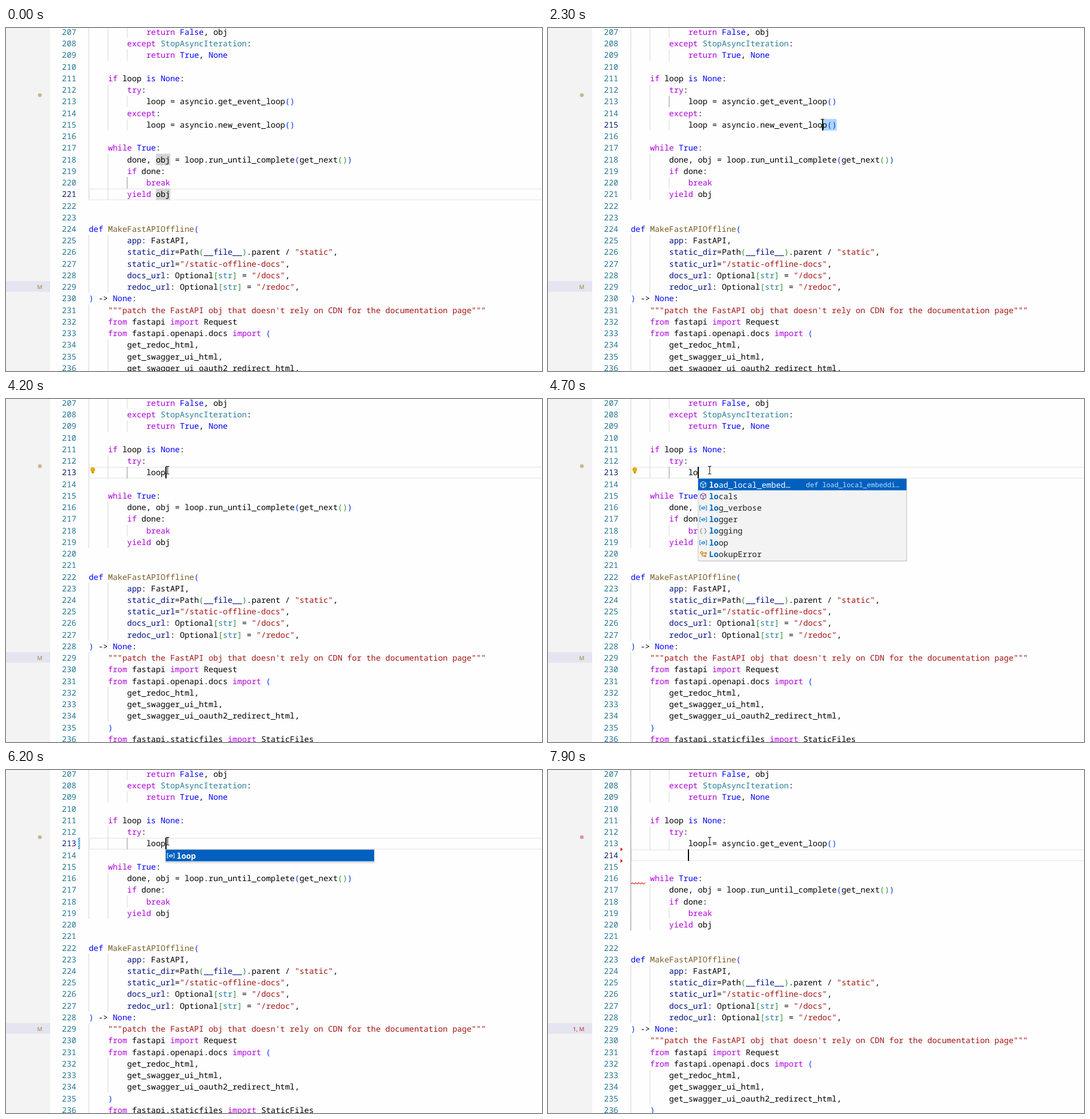
These frames come from a looping animation (935 by 599 pixels, 8 s). An HTML page:

```html
<!DOCTYPE html>
<html lang="en">
<head>
<meta charset="utf-8">
<title>Editor session</title>
<style>
html, body { margin: 0; width: 100%; height: 100%; overflow: hidden; background: #fefefe; }
svg { display: block; width: 935px; height: 599px; }
text { white-space: pre; text-rendering: geometricPrecision; }
.code { font: 13.92px "Noto Sans Mono", "DejaVu Sans Mono", monospace; }
.detail { font: 500 11.8px "Noto Sans Mono", "DejaVu Sans Mono", monospace; }
.ui { font: 600 10px "Open Sans", "Noto Sans", sans-serif; }
.doc { font: 13px "Open Sans", "Noto Sans", sans-serif; }
</style>
</head>
<body>
<svg id="stage" viewBox="0 0 935 599"></svg>
<script>
const LOOP = 8000, STEP = 100;
const X0 = 144.5, CW = 8.352, LH = 20.24, TOP = -3.1, FIRST = 207;
const BLUE = '#0000ff', PURPLE = '#af00db', TEAL = '#267f99', NAVY = '#001080';
const BRACKETS = ['#0431fa', '#319331', '#7b3814'];
const stage = document.getElementById('stage');

const HEAD = `            return False, obj
        except StopAsyncIteration:
            return True, None

    if loop is None:
        try:`.split('\n');
const ASSIGN = '            loop = asyncio.get_event_loop()';
const FALLBACK = ['        except:', '            loop = asyncio.new_event_loop()'];
const TAIL = `
    while True:
        done, obj = loop.run_until_complete(get_next())
        if done:
            break
        yield obj


def MakeFastAPIOffline(
        app: FastAPI,
        static_dir=Path(__file__).parent / "static",
        static_url="/static-offline-docs",
        docs_url: Optional[str] = "/docs",
        redoc_url: Optional[str] = "/redoc",
) -> None:
    """patch the FastAPI obj that doesn't rely on CDN for the documentation page"""
    from fastapi import Request
    from fastapi.openapi.docs import (
        get_redoc_html,
        get_swagger_ui_html,
        get_swagger_ui_oauth2_redirect_html,
    )
    from fastapi.staticfiles import StaticFiles`.split('\n');

const COLORS = {};
const paint = (words, color) => words.split(' ').forEach(w => COLORS[w] = color);
paint('return except if try while break yield from import', PURPLE);
paint('False True None def is', BLUE);
paint('StopAsyncIteration str', TEAL);
paint('MakeFastAPIOffline', '#795e26');
paint('app static_dir static_url docs_url redoc_url __file__', NAVY);

const esc = s => s.replace(/&/g, '&amp;').replace(/</g, '&lt;').replace(/>/g, '&gt;');
const colX = col => X0 + col * CW;
const rowY = row => TOP + (row - FIRST) * LH;
const rect = (x, y, w, h, fill, more = '') =>
  `<rect x="${x}" y="${y}" width="${w}" height="${h}" fill="${fill}" ${more}/>`;
const path = (d, stroke, width = 1, more = '') =>
  `<path d="${d}" fill="none" stroke="${stroke}" stroke-width="${width}" ${more}/>`;
const label = (x, y, s, fill, cls = 'code', more = '') =>
  `<text x="${x}" y="${y}" fill="${fill}" class="${cls}" ${more}>${esc(s)}</text>`;

// Mouse keyframes: time, x, y
const MOUSE = [[100, 900, 8], [600, 420, 134], [1200, 420, 134], [1400, 395, 174],
  [2000, 507, 172], [2100, 507, 172], [3000, 282, 124]];

function mouseAt(t) {
  if (t < 100) return null;
  const i = MOUSE.findIndex(k => k[0] > t);
  if (i < 0) return [282, 124];
  const [a, b] = [MOUSE[i - 1], MOUSE[i]];
  let p = (t - a[0]) / (b[0] - a[0]);
  p = p * p * (3 - 2 * p);
  return [a[1] + (b[1] - a[1]) * p, a[2] + (b[2] - a[2]) * p];
}

// What has been typed after the indent on line 213, by time
const TYPED = [[4200, 'loop'], [4600, 'loo'], [4700, 'lo'], [4800, 'l'], [5000, ''],
  [5700, 'l'], [5800, 'lo'], [6000, 'loo'], [6200, 'loop'], [6400, 'loop ']];

const LISTS = {
  l: ['k lambda', 'f len', 'f license', 'c list', 'f list_config_llm_models',
    'f list_embed_models', 'f list_online_embed_models', 'f llm_device',
    'f load_local_embeddings', 'f locals', 'v log_verbose', 'v logger'],
  lo: ['f load_local_embed…', 'f locals', 'v log_verbose', 'v logger', 'm logging',
    'v loop', 'c LookupError'],
  loo: ['v loop', 'c LookupError'],
  loop: ['v loop']
};
const DETAILS = { l: 'keyword lambda', lo: 'def load_local_embeddi…' };

function stateAt(t) {
  const mouse = mouseAt(t);
  const s = { mouse, row: 213, col: 16, caret: true, line: ASSIGN, extra: FALLBACK };
  if (t < 900) Object.assign(s, { row: 221, caret: false });
  else if (t < 2000) Object.assign(s, { col: 33, caret: t < 1300 });
  else if (t < 4200) {
    s.row = Math.floor((mouse[1] - TOP) / LH) + FIRST;
    const text = s.row === 213 ? ASSIGN : FALLBACK[s.row - 214];
    s.col = Math.min(text.length, Math.round((mouse[0] - 4 - X0) / CW));
    s.select = t >= 2200;
    s.caret = t < 3300 || t >= 3800;
  } else if (t < 7400) {
    const typed = TYPED.filter(k => k[0] <= t).pop()[1];
    s.line = ' '.repeat(12) + typed;
    s.col = s.line.length;
    s.extra = [];
    if (t >= 4500 && LISTS[typed]) s.list = typed;
    s.ghost = t >= 6500;
    s.caret = !(t >= 5200 && t < 5700) && !(t >= 6500 && t < 7000);
  } else if (t < 7600) Object.assign(s, { col: 43, extra: [] });
  else Object.assign(s, { row: 214, col: 12, extra: [''] });

  s.lines = [...HEAD, s.line, ...s.extra, ...TAIL];
  s.bulb = s.row === 213 && t >= 1100 && t < 5100;
  s.changed = t >= 5200 && t < 7400;
  s.error = t >= 7000;
  s.entered = t >= 7600;
  s.failed = t >= 7700;
  s.active = t < 900 ? [8, 220, 220]
    : s.entered ? [0, 207, 220]
    : s.line.trim() ? [8, 213, 213] : [4, 212, 212];
  return s;
}

function codeLine(text, y, depth) {
  let out = '';
  for (const m of text.matchAll(/"""[^]*?"""|"[^"]*"|\w+|[()[\]]|[^\s\w()[\]"]+/g)) {
    const w = m[0];
    let color = '#000';
    if (w[0] === '"') color = '#a31515';
    else if (/[([]/.test(w)) color = BRACKETS[depth.n++ % 3];
    else if (/[)\]]/.test(w)) color = BRACKETS[--depth.n % 3];
    else if (Object.hasOwn(COLORS, w)) color = COLORS[w];
    out += `<tspan x="${colX(m.index).toFixed(2)}" fill="${color}">${esc(w)}</tspan>`;
  }
  return `<text y="${y}" class="code">${out}</text>`;
}

const indent = text => text.search(/\S/);

function guides(s) {
  let out = '';
  s.lines.forEach((text, i) => {
    const solid = s.lines.slice(i).find(l => l.trim()) || '';
    const row = FIRST + i;
    for (let col = 0; col < indent(solid); col += 4) {
      const [c, from, to] = s.active;
      const on = col === c && row >= from && row <= to;
      out += rect(colX(col) - .5, rowY(row), 1, LH, on ? '#8f8f8f' : '#d6d6d6');
    }
  });
  return out;
}

function selection(s) {
  let out = '', dots = '';
  for (let row = s.row; row <= 215; row++) {
    const text = s.lines[row - FIRST];
    const from = row === s.row ? s.col : 0;
    const to = row === 215 ? 43 : text.length + 1;
    out += rect(colX(from), rowY(row), Math.max(0, to - from) * CW, LH + .1, '#add6ff', 'rx="2"');
    for (let c = from; c < text.length; c++)
      if (text[c] === ' ')
        dots += `<circle cx="${colX(c + .5)}" cy="${rowY(row) + 10.6}" r=".9" fill="#7f9fbd"/>`;
  }
  return out + dots;
}

function icon(kind, x, y, on) {
  const tint = c => on ? '#fff' : c;
  const at = `transform="translate(${x} ${y})"`;
  if (kind === 'f') return path('M0-5.5 4.7-3V2.8L0 5.5-4.7 2.8V-3ZM-4.7-3 0-.4 4.7-3M0-.4V5.5', tint('#652d90'), 1, at);
  if (kind === 'v') return path('M-4-4H-6V4H-4M4-4H6V4H4M-3 0 0-2.2 3-1V1.2L0 2.6-3 1ZM-3 0 0 .5 3-1', tint('#007acc'), 1, at);
  if (kind === 'c') return path('M-5-2.5-2.5-5 0-2.5-2.5 0ZM0-2H3.5M-1.5 0V3H2M3-2 4.5-3.5 6-2 4.5-.5ZM2 3 3.5 1.5 5 3 3.5 4.5Z', tint('#d67e00'), 1.3, at);
  if (kind === 'm') return path('M-2-4.5Q-4-4.5-4-2.5T-5.5 0Q-4 .5-4 2.5T-2 4.5M2-4.5Q4-4.5 4-2.5T5.5 0Q4 .5 4 2.5T2 4.5', tint('#616161'), 1, at);
  return path('M-6-4H0M2-4H6M-6-1.3H-3M-1-1.3H5M-6 1.4H2M4 1.4H6M-6 4H-2M0 4H5', tint('#616161'), 1.1, at);
}

function popup(s) {
  const items = LISTS[s.list], x = colX(s.col) + .5, y = 138.9, w = 363.5;
  const h = items.length * LH + 2;
  let out = rect(x + 1, y + 2, w, h, '#000', 'opacity=".08" rx="2"') +
    rect(x, y, w, h, '#f3f3f3', 'stroke="#c8c8c8"') +
    rect(x, y + .3, w, LH, '#0060c0');
  items.forEach((item, i) => {
    const name = item.slice(2), n = s.list.length, by = y + 15.6 + i * LH, on = !i;
    out += icon(item[0], x + 8.8, y + 10.8 + i * LH, on) +
      `<text x="${x + 19}" y="${by}" class="code" fill="${on ? '#fff' : '#1e1e1e'}">` +
      `<tspan font-weight="700" fill="${on ? '#fff' : '#0066bf'}">${name.slice(0, n)}</tspan>` +
      `<tspan x="${x + 19 + n * CW}">${name.slice(n)}</tspan></text>`;
  });
  const long = items.length === 12;
  if (DETAILS[s.list])
    out += label(x + w - (long ? 9 : 12.5), y + 14.8, DETAILS[s.list], '#c4dcf3', 'detail', 'text-anchor="end"');
  if (long) out += rect(x + w - 8.7, y, 8.7, 148, '#bababa');
  return out;
}

const hoverBox = (x, y, w, h) => rect(x, y, w, h, '#f8f8f8', 'stroke="#c8c8c8" rx="2"');

function hover(t) {
  if (t >= 500 && t < 900) {
    return hoverBox(370, .5, 564, 117.5) +
      label(379, 20, '(function) def get_event_loop() -> AbstractEventLoop', '#1e1e1e') +
      rect(370, 31, 564, 1, '#dcdcdc') +
      ['Return an asyncio event loop.',
        'When called from a coroutine or a callback, this function will always return',
        'the running event loop.'].map((l, i) => label(379, 51 + i * 24, l, '#333', 'doc')).join('');
  }
  if (t >= 3200 && t < 4200) {
    const fade = t < 3300 ? .4 : 1;
    return `<g opacity="${fade}">` + hoverBox(245.5, 61.5, 379, 56.5) +
      label(254, 83, '(parameter) loop: AbstractEventLoop | None', '#1e1e1e') +
      label(254, 104, '(variable) loop: AbstractEventLoop', '#1e1e1e') + '</g>';
  }
  return '';
}

function sidebar(s) {
  return rect(0, 0, 77, 599, '#f3f3f3') + rect(0, 442, 77, 18.5, '#e4e5f0') +
    `<circle cx="59" cy="117.3" r="3.3" fill="${s.failed ? '#d99a98' : '#c8b68a'}"/>` +
    label(63.5, 455.7, s.failed ? '1, M' : 'M', s.failed ? '#c4504e' : '#b09655', 'ui', 'text-anchor="end"');
}

function gutter(s) {
  let out = '';
  s.lines.forEach((_, i) => {
    const row = FIRST + i;
    out += label(122.6, rowY(row) + 15, String(row), row === s.row ? '#0b216f' : '#237893', 'code', 'text-anchor="end"');
  });
  if (s.changed) out += rect(126, rowY(213), 3.2, LH, 'url(#hatch)');
  if (s.entered)
    for (const row of [214, 215])
      out += `<path d="M126.5 ${rowY(row) - 3.3}l4 3.3-4 3.3z" fill="#d8100c"/>`;
  if (s.bulb)
    out += '<circle cx="151.3" cy="123.2" r="4" fill="#e8ab00"/>' + rect(149.6, 126.5, 3.5, 3.6, '#c48f00', 'rx="1"');
  return out;
}

function squiggle(row) {
  let d = `M144.5 ${rowY(row) + 20}`;
  for (let i = 0; i < 9; i++) d += `l2.8 ${i % 2 ? 2.2 : -2.2}`;
  return path(d, '#e51400', 1.1);
}

function render(t) {
  const s = stateAt(t), depth = { n: 0 };
  const mark = (row, col, n) => rect(colX(col), rowY(row), n * CW, LH, '#d4d4d4');
  let out = `<defs><pattern id="hatch" width="3" height="3" patternUnits="userSpaceOnUse"
    patternTransform="rotate(-45)"><rect width="3" height="1.9" fill="#2090d3"/></pattern></defs>` +
    rect(0, 0, 935, 599, '#fefefe') + sidebar(s);
  if (!s.select)
    out += rect(145, rowY(s.row) + .8, 800, LH - 1.2, 'none', 'stroke="#ebebeb" stroke-width="1.5"');
  if (t < 900) out += mark(218, 14, 3) + mark(221, 14, 3);
  else if (t >= 1000 && t < 2000) out += mark(213, 27, 14);
  if (s.select) out += selection(s);
  out += guides(s) + gutter(s);
  s.lines.forEach((text, i) => out += codeLine(text, rowY(FIRST + i) + 15, depth));
  if (t >= 7400 && t < 7900)
    out += rect(colX(41) + .5, rowY(213) + .5, CW * 2 - 1, LH - 1, 'none', 'stroke="#b9b9b9"');
  if (s.ghost) out += label(colX(17), rowY(213) + 15, '= asyncio.get_event_loop()', '#9a9a9a', 'code', 'font-style="italic"');
  if (s.error) out += squiggle(s.entered ? 216 : 215);
  if (s.list) out += popup(s);
  out += hover(t);
  if (s.caret) out += rect(Math.round(colX(s.col) - .5), rowY(s.row), 2, LH, '#000');
  if (s.mouse) {
    const [x, y] = s.mouse;
    out += path('M-3-6.5H-1L0-5.5 1-6.5H3M0-5.5V6M-3 7H-1L0 6 1 7H3', '#222', 1.2, `transform="translate(${x} ${y})"`);
  }
  stage.innerHTML = out;
}

const start = performance.now();
let shown = -1;
function tick() {
  const t = Math.floor(((performance.now() - start) % LOOP) / STEP) * STEP;
  if (t !== shown) render(shown = t);
  requestAnimationFrame(tick);
}
tick();
</script>
</body>
</html>
```
